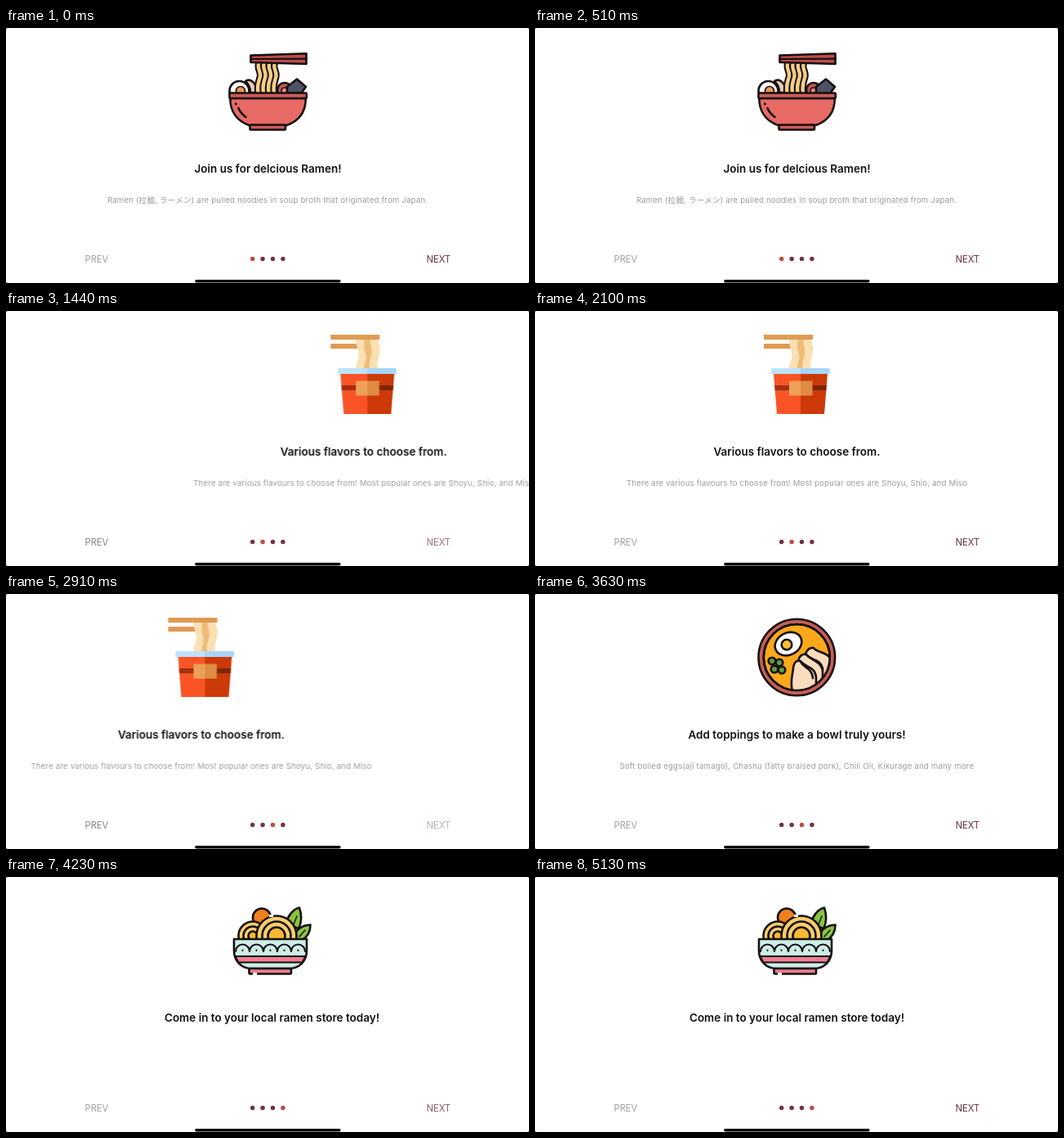
Animation, 640 px wide and 312 px high, one loop 5160 ms. Source, as an HTML page:

```html
<!DOCTYPE html>
<html lang="en">
<head>
<meta charset="utf-8">
<title>Ramen onboarding</title>
<style>
html, body { margin: 0; width: 100%; height: 100%; overflow: hidden; background: #8a8a8a; }
svg { display: block; width: 640px; height: 312px; background: #fff; border-radius: 3px; overflow: hidden; }
text { font-family: Inter, "Noto Sans CJK JP", "Noto Sans CJK", sans-serif; }
.title { font-size: 13.5px; font-weight: 600; fill: #111; text-anchor: middle; }
.note { font-size: 9.6px; letter-spacing: .19px; fill: #9b9b9b; text-anchor: middle; }
.nav { font-size: 11.2px; }
.ink { stroke: #15100f; stroke-width: 2.6; stroke-linejoin: round; stroke-linecap: round; }
.line { fill: none; }
</style>
</head>
<body>
<svg viewBox="0 0 640 312">
  <defs>
    <path id="strand" d="M311 42c-4 7 3 11 1 18s-4 12-2 20" fill="none"/>
    <clipPath id="soup"><circle cx="320.3" cy="77.5" r="40.5"/></clipPath>
  </defs>
  <g id="track">
    <!-- bowl with chopsticks -->
    <g class="page">
      <g class="ink">
        <circle cx="285.5" cy="77" r="12" fill="#fff"/>
        <circle cx="287" cy="77" r="5.5" fill="#f0994a" stroke-width="1.6"/>
        <path d="M293 65c6-4 14 2 14 14h-8c0-6-2-10-6-14z" fill="#f1c9b8"/>
        <circle cx="341" cy="76" r="9" fill="#c05552"/>
        <circle cx="341" cy="77" r="4" fill="#e58a80" stroke-width="1.6"/>
        <path d="M344 72l12-9.5 11 9.500-6 8h-17z" fill="#4d5266"/>
      </g>
      <g id="strands"></g>
      <g class="ink">
        <path d="M299.500 33.500l68-2.300v12.800l-68-2z" fill="#bd4b4d"/>
        <path class="line" d="M300 38l67.500-.3" stroke-width="2.200"/>
        <path d="M274.300 86h92.500c0 17-9 28-23.300 33h-46c-14-5-23.200-16-23.200-33z" fill="#e76a64"/>
        <rect x="273.500" y="79.500" width="94.300" height="6.500" rx="1" fill="#cf5b57"/>
        <rect x="298.500" y="118.500" width="43.500" height="6" rx="1" fill="#cf5b57"/>
        <path class="line" d="M284.500 98c2 5 5 8 9 11M281.300 92.500v.8"/>
      </g>
      <text class="title" x="320.500" y="177.200">Join us for delcious Ramen!</text>
      <text class="note" x="320" y="214.300">Ramen (拉麺, ラーメン) are pulled noodles in soup broth that originated from Japan.</text>
    </g>
    <!-- instant cup -->
    <g class="page">
      <path d="M280 29h60v6h-60zM280 40h36v6h-36z" fill="#df9a52"/>
      <path d="M311 29.500h27c-1 9 4 13 2 22s-4 12-2 20h-27c-1-8 5-12 3-21s-4-13-3-21z" fill="#fbe0b4"/>
      <path d="M322 34h7c-2 8 3 11 1 19s-4 11-2 18h-7c-1-7 4-10 2-18s-3-11-1-19z" fill="#eebc76"/>
      <path d="M311 29h29v6h-29z" fill="#df9a52"/>
      <path d="M292 76h33v50h-29z" fill="#fa5426"/>
      <path d="M325 76h33l-4 50h-29z" fill="#cb3a08"/>
      <path d="M293.200 91h31.800v6h-31.300z" fill="#a32f12"/>
      <path d="M325 91h31.800l-.5 6h-31.300z" fill="#7f2408"/>
      <rect x="311" y="85.500" width="14.500" height="18" fill="#eda057"/>
      <rect x="325" y="85.500" width="14.500" height="18" fill="#df8c43"/>
      <rect x="289" y="70" width="71.500" height="7" rx="1" fill="#a6d6f8"/>
      <rect x="289" y="70" width="36" height="7" rx="1" fill="#bde2fb"/>
      <text class="title" x="320.500" y="177.200">Various flavors to choose from.</text>
      <text class="note" x="320.500" y="214.300">There are various flavours to choose from! Most popular ones are Shoyu, Shio, and Miso</text>
    </g>
    <!-- bowl from above -->
    <g class="page">
      <g class="ink">
        <circle cx="320.300" cy="77.500" r="46.800" fill="#c75f56"/>
        <circle cx="320.300" cy="77.500" r="40.500" fill="#fba81c"/>
        <ellipse cx="310" cy="61" rx="17" ry="13.500" transform="rotate(-28 310 61)" fill="#fff"/>
        <circle cx="308" cy="62" r="6.300" fill="#fbc02d"/>
        <g id="peas" fill="#5f9c48"></g>
        <g clip-path="url(#soup)" fill="#fbdcbf">
          <path d="M330 76c2-7 6-11 11-10 4 6 14 4 20 12v30h-20z"/>
          <path d="M322 82c1-6 5-9 10-8 5 7 17 5 20 17v26h-24z"/>
          <path d="M315 119c-3-12 0-19 1-28s5-10 9-9c5 8 18 6 19 20v18z"/>
          <path class="line" d="M325 83c4 8 14 7 15 20M333 75c6 7 16 7 19 18"/>
        </g>
        <circle class="line" cx="320.300" cy="77.500" r="40.500"/>
      </g>
      <text class="title" x="320.500" y="177.200">Add toppings to make a bowl truly yours!</text>
      <text class="note" x="320.300" y="214.300">Soft boiled eggs(aji tamago), Chashu (fatty braised pork), Chili Oil, Kikurage and many more</text>
    </g>
    <!-- patterned bowl -->
    <g class="page">
      <g class="ink">
        <path d="M338 56c2-9 9-17 16-18.500 3 9 3 18-1 26z" fill="#8ac43f"/>
        <path d="M347 77c0-11 9-18 20.500-18.500 0 9-4 15-10 18.500z" fill="#8ac43f"/>
        <path class="line" d="M346 60l5-12M354 73l7-8" stroke-width="1.500"/>
        <circle cx="308" cy="49.500" r="11" fill="#f0801e"/>
        <g id="coils" fill="#f8cd6c"></g>
        <path d="M274 76h89v14c0 13-9 22-22 22h-45c-13 0-22-9-22-22z" fill="#cdeee6"/>
        <path d="M275.500 97h86l-4 7.500h-78z" fill="#ee7d92" stroke-width="2"/>
        <path id="scallops" class="line" stroke-width="2.200"/>
        <path id="specks" class="line" stroke-width="2"/>
        <rect x="292.500" y="112" width="51.500" height="6.500" rx="1" fill="#ee7d92"/>
      </g>
      <path d="M297 118.500h5M317 47.500h5" stroke="#fff" stroke-width="2.800"/>
      <text class="title" x="320.500" y="177.200">Come in to your local ramen store today!</text>
    </g>
  </g>
  <text id="prev" class="nav" x="96.500" y="286.500" fill="#a0a0a0">PREV</text>
  <g id="dots"></g>
  <text id="next" class="nav" x="514.500" y="286.500" fill="#66303f">NEXT</text>
  <rect x="231.200" y="307.900" width="178.300" height="3.500" rx="1.700" fill="#000"/>
</svg>
<script>
const LOOP = 5160, WIDTH = 640;
const $ = id => document.getElementById(id);

function add(parent, tag, attrs) {
  const el = document.createElementNS('http://www.w3.org/2000/svg', tag);
  for (const key in attrs) el.setAttribute(key, attrs[key]);
  return parent.appendChild(el);
}

const circle = (parent, cx, cy, r, more) => add(parent, 'circle', { cx, cy, r, ...more });

document.querySelectorAll('.page').forEach((page, i) =>
  page.setAttribute('transform', `translate(${i * WIDTH} 0)`));

for (const [stroke, width] of [['#15100f', 8.4], ['#f6cd86', 4.3]])
  for (let i = 0; i < 4; i++)
    add($('strands'), 'use', { href: '#strand', x: i * 6.5 - 1.2, stroke, 'stroke-width': width });

for (const [x, y] of [[290, 82], [299, 84], [293, 92], [302, 93]]) circle($('peas'), x, y, 4.3);

for (const [x, radii] of [[297, [17.5, 11.5, 5.5]], [326, [24.5, 17.5, 10.5]]])
  radii.forEach((r, i) => circle($('coils'), x, 72, r, i == 2 ? { fill: '#f9b934' } : {}));

$('scallops').setAttribute('d', 'M276 91' + 'a8.5 8.5 0 0 1 17 0'.repeat(5));
$('specks').setAttribute('d', [0, 1, 2, 3, 4].map(i => `M${284.5 + i * 17} 89.5v.5`).join(''));

const dots = [0, 1, 2, 3].map(i => circle($('dots'), 301.7 + i * 12.4, 282.5, 2.7));

// Steps: [ms, value, easing towards the following step]
const HOLD = 'steps(1)', EASE = 'ease-in-out';
function play(el, prop, steps) {
  const frames = steps.map(([ms, value, easing = 'linear']) =>
    ({ offset: ms / LOOP, [prop]: value, easing }));
  frames.push({ offset: 1, [prop]: steps[steps.length - 1][1] });
  el.animate(frames, { duration: LOOP, iterations: Infinity }).startTime = 0;
}

play($('track'), 'transform', [
  [0, 0, HOLD], [1230, 0, EASE], [1530, -640, HOLD],
  [2670, -640, 'ease-in'], [2745, -721.5, HOLD], [2940, -1275, 'ease-out'], [2985, -1280, HOLD],
  [3950, -1280, EASE], [4250, -1920, HOLD]
].map(([ms, x, easing]) => [ms, `translateX(${x}px)`, easing]));

play($('next'), 'opacity', [
  [0, 1, HOLD], [1100, .2, HOLD], [1200, .2], [1500, .8], [1670, 1, HOLD],
  [2580, .2, HOLD], [2640, .2], [2745, .4, HOLD], [2940, .75], [3120, 1, HOLD],
  [3810, .2, HOLD], [3930, .2], [4230, .8], [4400, 1, HOLD]
]);

const REST = '#a0a0a0', DARK = '#858585';
play($('prev'), 'fill', [
  [0, REST, HOLD], [1180, DARK, HOLD], [1530, REST, HOLD],
  [2650, DARK, HOLD], [2985, REST, HOLD], [3930, DARK, HOLD], [4200, REST, HOLD]
]);

const turns = [0, 1180, 2650, 3930];
dots.forEach((dot, i) => play(dot, 'fill',
  turns.map((ms, page) => [ms, page == i ? '#c04a3f' : '#733045', HOLD])));
</script>
</body>
</html>
```
